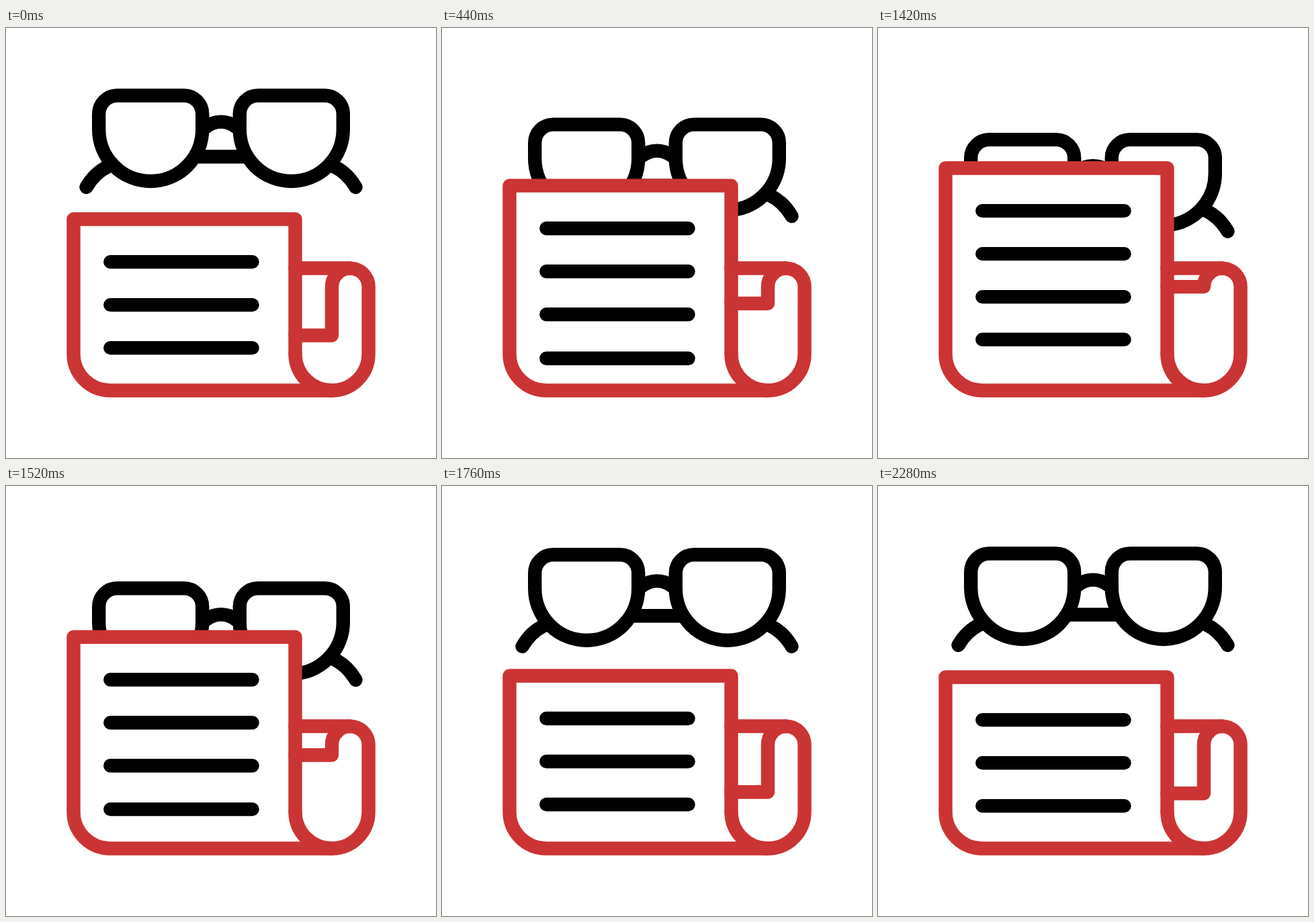
Recreate the animation shown at these times as an HTML page. Size 640 px wide and 640 px high, loop 2400 ms.

```html
<!DOCTYPE html>
<html lang="en">
<head>
<meta charset="utf-8">
<title>Glasses and newspaper</title>
<style>
  html, body { margin: 0; width: 100%; height: 100%; overflow: hidden; background: #fff; }
  svg { display: block; width: 100%; height: 100%; }
  .ink, .red { fill: none; stroke-width: 20.4; stroke-linecap: round; stroke-linejoin: round; }
  .ink { stroke: #000; }
  .red { stroke: #cb3434; }
</style>
</head>
<body>
<svg viewBox="0 0 640 640">
  <defs>
    <path id="lens" d="M165.5 100.5 H265 a27.2 27.2 0 0 1 27.2 27.2 V151 a77 77 0 0 1 -154 0 V127.7 a27.2 27.2 0 0 1 27.3 -27.2 Z"/>
    <path id="arm" d="M119.5 237 Q132 215.500 152 206"/>
    <clipPath id="lenses">
      <use href="#lens"/>
      <use href="#lens" x="209.6"/>
    </clipPath>
    <clipPath id="page"><rect x="100" y="190" width="330" height="349.500"/></clipPath>
  </defs>

  <g id="glasses">
    <g id="glare" class="red" clip-path="url(#lenses)"></g>
    <g class="ink">
      <use href="#arm"/>
      <use href="#arm" transform="matrix(-1 0 0 1 640 0)"/>
      <path d="M297.5 147.500 A36 36 0 0 1 342.5 147.500"/>
      <path d="M284 191.500 H356" stroke-linecap="butt"/>
      <use href="#lens"/>
      <use href="#lens" x="209.6"/>
    </g>
  </g>

  <path id="paper" fill="#fff"/>
  <g class="ink" clip-path="url(#page)">
    <path id="rows"/>
  </g>
  <g class="red">
    <path id="sheet"/>
    <path d="M430.500 357.500 H512.500"/>
    <path id="tongue"/>
  </g>
</svg>

<script>
const LOOP = 2400;
const MOVE = 400;
const RAISE = 200, LOWER = 1400;
const SHINE = 1800, SWEEP = 230;
const DIR = { x: 0.648, y: -0.762 };

// Streaks: a point on the path, travel sign along DIR, distance left to the rim
const streaks = [
  { x: 172, y: 174.5, sign: -1, rest: 30 },
  { x: 247.5, y: 135, sign: 1, rest: 44 },
  { x: 388, y: 174.5, sign: -1, rest: 35 },
  { x: 458.5, y: 148.5, sign: 1, rest: 58 }
];

const $ = id => document.getElementById(id);
const ease = (t, start, span) => {
  const u = Math.min(1, Math.max(0, (t - start) / span));
  return u * u * (3 - 2 * u);
};

for (const s of streaks) {
  s.line = document.createElementNS("http://www.w3.org/2000/svg", "line");
  $("glare").append(s.line);
}

function place(s, u, n) {
  const d = s.sign * s.rest * (4.5 * u - 3.5);
  s.line.setAttribute("x" + n, s.x + DIR.x * d);
  s.line.setAttribute("y" + n, s.y + DIR.y * d);
}

function draw(t) {
  const p = ease(t, RAISE, MOVE) - ease(t, LOWER, MOVE);
  const top = 284.5 - 76.6 * p;
  const row = y => `M155.3 ${y} H366.6 `;

  $("glasses").setAttribute("transform", `translate(0 ${66.2 * p})`);
  $("paper").setAttribute("d", `M100.5 ${top} H430.5 V539 H155 L100.5 485 Z`);
  $("sheet").setAttribute("d",
    `M485 539.5 H155 a54.5 54.5 0 0 1 -54.5 -54.5 V${top} H430.5 V485`);
  $("tongue").setAttribute("d",
    `M430.5 ${457.5 - 73 * p} H485 V385 a27.3 27.3 0 0 1 54.6 0 V485 a54.55 54.55 0 0 1 -109.1 0`);

  const rows = [0, 1, 2].map(i => row(top + 63.6 + 64 * i));
  $("rows").setAttribute("d", rows.join("") + row(545.7 - 82.7 * p));

  const head = ease(t, SHINE, SWEEP);
  const tail = ease(t, SHINE + SWEEP, SWEEP);
  $("glare").style.display = head > 0 && tail < 1 ? "" : "none";
  for (const s of streaks) {
    place(s, tail, 1);
    place(s, head, 2);
  }
}

function tick() {
  draw(performance.now() % LOOP);
  requestAnimationFrame(tick);
}
tick();
</script>
</body>
</html>
```
